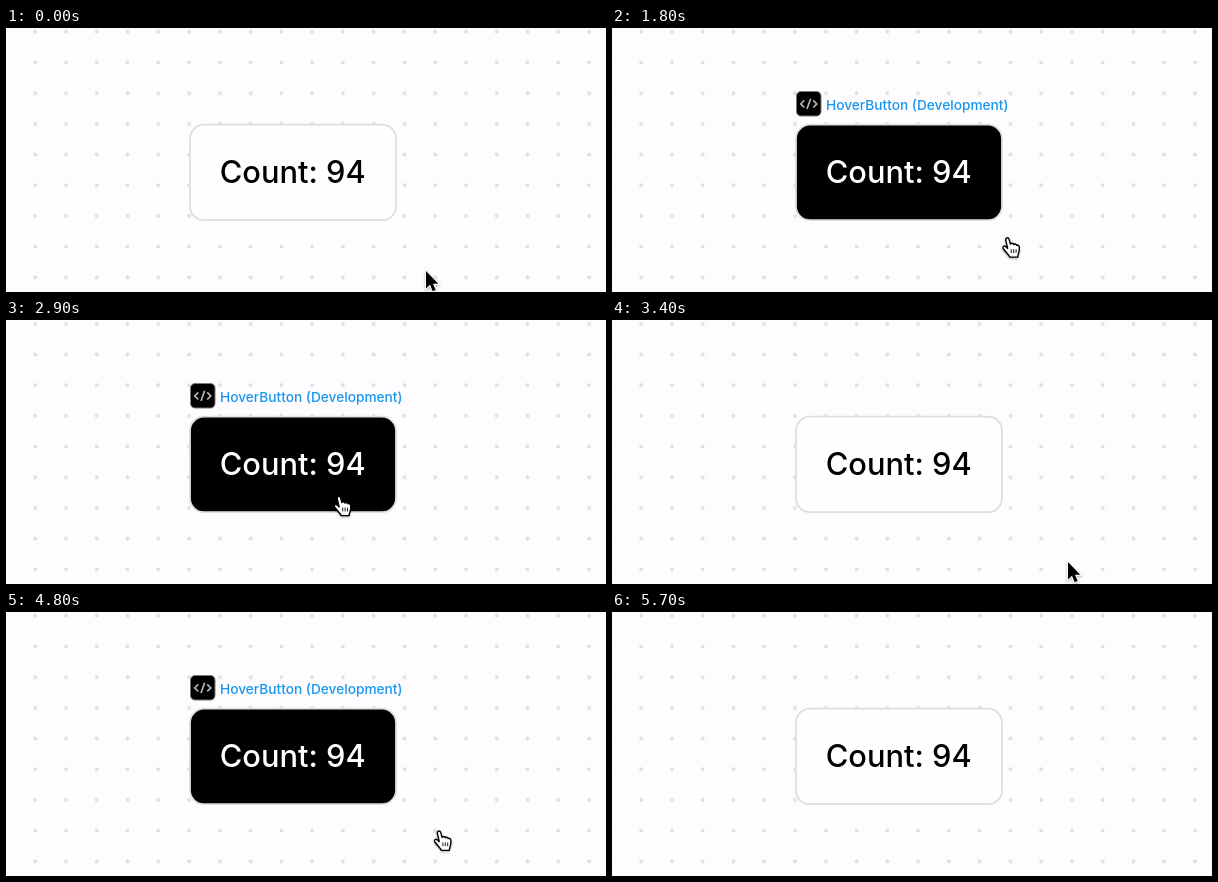
Animation, 600 px wide and 264 px high, one loop 6.5 s. Source, as an HTML page:

```html
<!DOCTYPE html>
<html lang="en">
<head>
<meta charset="utf-8">
<title>Hover button</title>
<style>
  html, body { margin: 0; width: 100%; height: 100%; overflow: hidden; background: #fefcff; }
  svg { display: block; width: 600px; height: 264px; }
  text { font-family: Inter, sans-serif; font-weight: 500; }
  #cursor { filter: drop-shadow(0 1px 1px rgba(0, 0, 0, .3)); }
</style>
</head>
<body>
<svg viewBox="0 0 600 264">
  <defs>
    <pattern id="dots" x="13.8" y="-11.6" width="30.77" height="30.7" patternUnits="userSpaceOnUse">
      <circle cx="15.4" cy="15.35" r="1.9" fill="#dfdee3"/>
    </pattern>
  </defs>
  <rect width="600" height="264" fill="url(#dots)"/>

  <rect id="button" x="184" y="96.7" width="206" height="95.5" rx="14" stroke="#dedde2" stroke-width="1.8"/>
  <text id="count" x="286.7" y="155" font-size="30.8" text-anchor="middle">Count: 94</text>

  <g id="label">
    <rect x="184.5" y="63.5" width="24.5" height="24.5" rx="4.5" fill="#000" stroke="#777"/>
    <path d="M192.3 72.3l-3.6 3.6 3.6 3.6M201.2 72.3l3.6 3.6-3.6 3.6M198.6 70.8l-3.6 10.2"
          fill="none" stroke="#b4b4b4" stroke-width="1.7"/>
    <text x="214" y="82" font-size="13.7" fill="#1797ec">HoverButton (Development)</text>
  </g>

  <g id="cursor">
    <path id="arrow" d="M0 0V17.5L4 13.8 6.7 20.2 9.7 19 7 12.8H12.3Z"
          stroke="#fff" stroke-width="2.2" paint-order="stroke"/>
    <g id="hand" transform="translate(-7 -.5)" stroke="#000" stroke-width="1.4"
       stroke-linejoin="round" stroke-linecap="round">
      <path fill="#fff" d="M5.4 11L3.6 3.2C2.9.4 6-.6 6.9 2L8.2 6.8C8.6 5.5 11 5.5 11.4 7.2
        C12.1 6.2 14 6.4 14.3 8C15.3 7.3 17 8 17 9.7V12.5C17 14.8 15.8 16 15.4 19.8H7.6
        C6.8 17.6 4 15.4 1 11.4C-.4 9 2 7.8 3.6 9.4Z"/>
      <path stroke-width=".9" d="M8.9 12.2l.2 3M11.4 12.2v3M13.9 12.2l-.1 3"/>
    </g>
  </g>
</svg>
<script>
const LOOP = 6500, STEP = 100, LAST_STEP = 55;
const rest = { x: 329, y: 174 };

// The pointer leaves its rest point, reaches (x, y) at step `out` and is home again at `home`.
const trips = [
  { leave: -1, out: 0, home: 7, x: 420, y: 243 },
  { leave: 9, out: 13, home: 16, x: 394, y: 217 },
  { leave: 16, out: 19, back: 20, home: 23, x: 447, y: 236 },
  { leave: 24, out: 26, home: 29.3, x: 474, y: 234 },
  { leave: 31, out: 34, home: 36.5, x: 456, y: 242 },
  { leave: 39.3, out: 43, home: 45.5, x: 464, y: 242 },
  { leave: 46, out: 49, home: 53, x: 512, y: 252 }
];

const el = id => document.getElementById(id);
const show = (id, on) => el(id).setAttribute("visibility", on ? "inherit" : "hidden");

function pointerAt(step) {
  if (step < 0 || step > LAST_STEP) return null;
  const trip = trips.find(t => step >= t.leave && step < t.home);
  if (!trip) return rest;
  const { leave, out, back = out, home, x, y } = trip;
  const progress = Math.min(1, (step - leave) / (out - leave), (home - step) / (home - back));
  const away = progress ** 1.35;
  return { x: rest.x + (x - rest.x) * away, y: rest.y + (y - rest.y) * away };
}

const isInside = p => !!p && p.x > 184 && p.x < 390 && p.y > 97 && p.y < 193;

function draw(time) {
  const step = Math.floor(time % LOOP / STEP);
  const pointer = pointerAt(step);
  const hovered = isInside(pointerAt(step - 1)); // hover reacts one step late

  el("button").setAttribute("fill", hovered ? "#000" : "#fefdff");
  el("count").setAttribute("fill", hovered ? "#fff" : "#000");
  show("label", hovered);
  show("cursor", pointer);
  show("arrow", !hovered);
  show("hand", hovered);
  if (pointer) el("cursor").setAttribute("transform", `translate(${pointer.x} ${pointer.y})`);
}

const start = performance.now();
function tick() {
  draw(performance.now() - start);
  requestAnimationFrame(tick);
}
tick();
</script>
</body>
</html>
```
